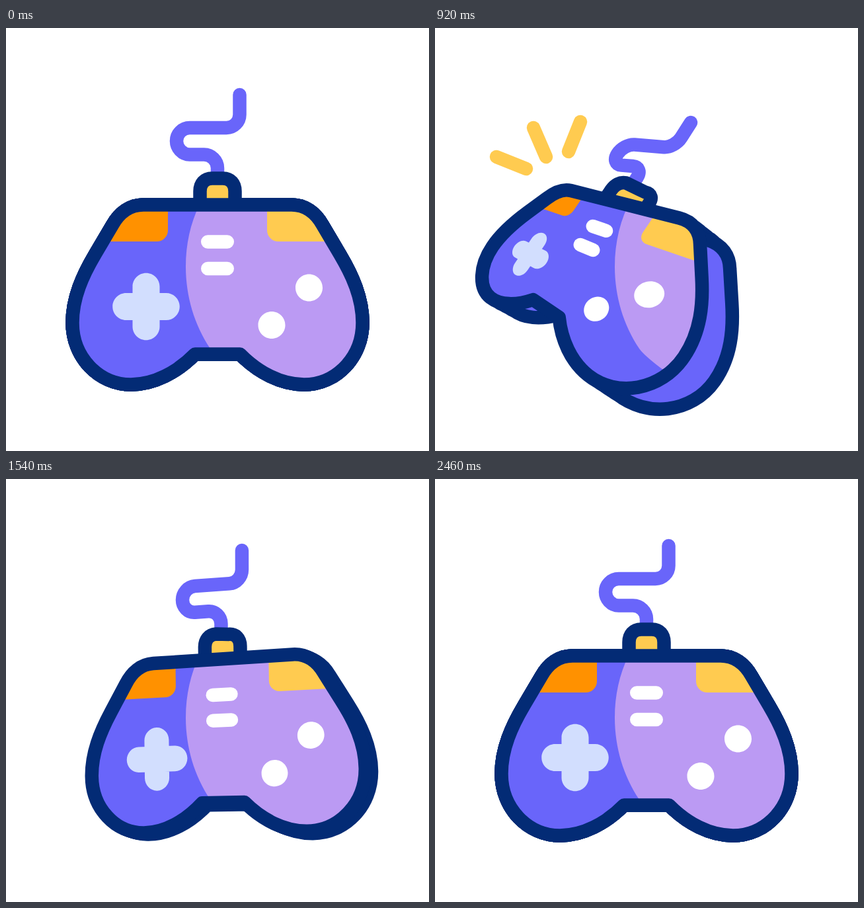
Write an HTML page that moves like this. It is 640 px wide and 640 px high and loops after 2700 ms.

```html
<!DOCTYPE html>
<html lang="en">
<head>
<meta charset="utf-8">
<title>Game controller</title>
<style>
  html, body { margin: 0; width: 100%; height: 100%; overflow: hidden; background: #fff; }
  svg { display: block; width: 100%; height: 100%; }
  .line { stroke-width: 20.5; stroke-linejoin: round; stroke-linecap: round; }
</style>
</head>
<body>
<svg id="stage" viewBox="0 0 640 640">
  <defs><clipPath id="inside"><path id="clip"/></clipPath></defs>
</svg>
<script>
const LOOP = 2700;
const NAVY = '#032b75', BLUE = '#6965fa', LILAC = '#bb9af3', YELLOW = '#ffcb50',
      ORANGE = '#ff9100', PALE = '#d2defe', WHITE = '#fff';

// Rounded bar as a path made of absolute points, so that it can be projected.
function bar(cx, cy, w, h) {
  const r = Math.min(w, h) / 2, k = r * 0.448;
  const l = cx - w / 2, t = cy - h / 2, R = cx + w / 2, b = cy + h / 2;
  return `M${l + r} ${t} L${R - r} ${t} C${R - k} ${t} ${R} ${t + k} ${R} ${t + r} ` +
    `L${R} ${b - r} C${R} ${b - k} ${R - k} ${b} ${R - r} ${b} ` +
    `L${l + r} ${b} C${l + k} ${b} ${l} ${b - k} ${l} ${b - r} ` +
    `L${l} ${t + r} C${l} ${t + k} ${l + k} ${t} ${l + r} ${t} Z`;
}

const shape = {
  body: 'M208 267.5 L432 267.5 C453 267.5 469 280 479 298 L505 342 C524 374 539.5 408 539.5 446 ' +
    'C539.5 498 500 539.5 451 539.5 C416 539.5 381 521 354 493.5 L286 493.5 ' +
    'C259 521 224 539.5 189 539.5 C140 539.5 100.5 498 100.5 446 ' +
    'C100.5 408 116 374 135 342 L161 298 C171 280 187 267.5 208 267.5 Z',
  neck: 'M293.5 267.5 L293.5 247 C293.5 235.5 300 227.5 312 227.5 L328 227.5 ' +
    'C340 227.5 346.5 235.5 346.5 247 L346.5 267.5',
  cable: 'M353.5 101 L353.5 131 C353.5 142 344.5 151 333.5 151 L278 151 C267 151 258 160 258 171 ' +
    'C258 182 267 191.5 278 191.5 L299.5 191.5 C310.5 191.5 320 200.5 320 212 L320 235',
  light: 'M302 250 C282 283 272 321 272 361 C272 406 285 449 309 485 C311 488 314 491 317 494 ' +
    'C333 509 354 525 376 534 L470 575 L640 575 L640 200 L330 200 Z',
  leftKey: 'M140 260 L245 260 L245 306 C245 315.5 237.5 323 228 323 L140 323 Z',
  rightKey: 'M500 260 L395 260 L395 306 C395 315.5 402.5 323 412 323 L500 323 Z',
  cross: bar(212, 421.5, 41, 101.5) + bar(212, 421.5, 101.5, 41),
  slots: 'M305.25 323.5 L334.75 323.5 M305.25 364 L334.75 364',
  dots: bar(458.5, 393, 41, 41) + bar(402, 449.5, 41, 41)
};

// Pose: top left, top right, cross, dot, cable end, cable corner, cable loop, depth.
const rest = [208, 267.5, 432, 267.5, 212, 421.5, 458.5, 393, 353.5, 101, 353.5, 151, 258, 171, 0, 0];
const turnA = [213.4, 267.3, 417.5, 276.1, 196.8, 405.2, 426, 399.5, 364.5, 114, 357.5, 162.5, 266, 183, 15, 8.5];
const turnB = [215.8, 266, 403.2, 281.9, 182.5, 389.5, 394, 404, 374, 126, 361.5, 171.5, 272, 192, 27.5, 16.5];
const turnC = [205.5, 246, 369.5, 287.5, 143, 342, 323.5, 403, 387, 143, 362.5, 181.5, 276, 190.5, 43.5, 33.5];
const swing = [222.9, 279, 433.3, 265.5, 228, 423.7, 461, 387.7, 357, 108, 357, 157, 267, 183, 9, 4];

function tilt(deg) {
  const c = Math.cos(deg * Math.PI / 180), s = Math.sin(deg * Math.PI / 180);
  const out = [];
  for (let i = 0; i < 14; i += 2) {
    const x = rest[i] - 336, y = rest[i + 1] - 137;
    out.push(336 + c * x + s * y, 137 - s * x + c * y);
  }
  return out.concat(0, 0);
}

const keys = [
  { t: 0, p: rest, stop: true },
  { t: 320, p: turnA },
  { t: 490, p: turnB },
  { t: 930, p: turnC, stop: true },
  { t: 1280, p: turnB },
  { t: 1540, p: swing },
  { t: 1715, p: tilt(8), stop: true },
  { t: 1940, p: tilt(5.15) },
  { t: 2260, p: rest, stop: true },
  { t: LOOP, p: rest, stop: true }
];

function slope(i, n) {
  const k = keys[i];
  if (k.stop) return 0;
  const a = keys[i - 1], b = keys[i + 1], h0 = k.t - a.t, h1 = b.t - k.t;
  return ((k.p[n] - a.p[n]) / h0 * h1 + (b.p[n] - k.p[n]) / h1 * h0) / (h0 + h1);
}

function poseAt(t) {
  let i = 0;
  while (i < keys.length - 2 && t >= keys[i + 1].t) i++;
  const a = keys[i], b = keys[i + 1], h = b.t - a.t, s = (t - a.t) / h;
  const s2 = s * s, s3 = s2 * s, e = 3 * s2 - 2 * s3;
  return a.p.map((v, n) => v + (b.p[n] - v) * e +
    h * ((s3 - 2 * s2 + s) * slope(i, n) + (s3 - s2) * slope(i + 1, n)));
}

// Barycentric coordinates of (x, y) in the triangle a, b, c.
function bary(x, y, [a, b, c]) {
  const ux = a[0] - c[0], uy = a[1] - c[1], vx = b[0] - c[0], vy = b[1] - c[1];
  const px = x - c[0], py = y - c[1], det = ux * vy - uy * vx;
  const m = (px * vy - py * vx) / det, n = (ux * py - uy * px) / det;
  return [m, n, 1 - m - n];
}

const at = (p, i) => [p[2 * i], p[2 * i + 1]];
const plate = p => [at(p, 2), at(p, 3), at(p, 0)];
const wire = p => [at(p, 4), at(p, 5), at(p, 6)];

function mapper(from, to, w) {
  return (x, y) => {
    const k = bary(x, y, from).map((v, i) => v * w[i]);
    const sum = k[0] + k[1] + k[2];
    return [0, 1].map(j => (k[0] * to[0][j] + k[1] * to[1][j] + k[2] * to[2][j]) / sum);
  };
}

// Perspective of the plate, moved back by a share of its depth.
function project(p, depth) {
  const q = p.slice(), dx = p[14] * depth, dy = p[15] * depth;
  for (const i of [0, 1, 2, 3]) {
    const right = i % 2;
    q[2 * i] += dx * (right ? 1 : 0.8);
    q[2 * i + 1] += dy * (right ? 1 : 0.62);
  }
  const from = plate(rest), to = plate(q);
  const a = bary(...at(rest, 1), from), b = bary(...at(q, 1), to);
  return mapper(from, to, a.map((v, i) => b[i] / v));
}

const warp = (d, map) => d.replace(/(-?[\d.]+) (-?[\d.]+)/g,
  (m, x, y) => map(+x, +y).map(v => v.toFixed(2)).join(' '));

const stage = document.getElementById('stage');
const clip = document.getElementById('clip');

function add(tag, attrs, parent = stage) {
  const el = document.createElementNS('http://www.w3.org/2000/svg', tag);
  for (const k in attrs) el.setAttribute(k, attrs[k]);
  return parent.appendChild(el);
}
const outlined = (fill, stroke) => add('path', { class: 'line', fill, stroke });

const sides = [0.25, 0.5, 0.75].map(depth => ({ depth, el: outlined(NAVY, NAVY) }));
const back = outlined(BLUE, NAVY);
const cable = outlined('none', BLUE);
const neck = outlined(YELLOW, NAVY);
const face = add('g', { 'clip-path': 'url(#inside)' });
const base = add('path', { fill: BLUE }, face);
add('path', { fill: LILAC, d: shape.light }, face);
const parts = [['leftKey', ORANGE], ['rightKey', YELLOW], ['cross', PALE], ['dots', WHITE]]
  .map(([name, fill]) => ({ name, el: add('path', { fill }, face) }));
parts.push({ name: 'slots', el: outlined('none', WHITE) });
const rim = outlined('none', NAVY);
const sparks = [[138, 213, 93, 195], [168, 195, 149, 151], [202, 187, 220, 142]]
  .map(ends => ({ ends, el: outlined('none', YELLOW) }));

function ease(t, from, to) {
  const s = Math.min(1, Math.max(0, (t - from) / (to - from)));
  return s * s * (3 - 2 * s);
}

function draw(t) {
  const pose = poseAt(t), front = project(pose, 0), middle = project(pose, 0.45);
  const set = (el, d) => el.setAttribute('d', d);
  const outline = warp(shape.body, front);

  for (const s of sides) set(s.el, warp(shape.body, project(pose, s.depth)));
  set(back, warp(shape.body, project(pose, 1)));
  set(cable, warp(shape.cable, mapper(wire(rest), wire(pose), [1, 1, 1])));
  // The right half of the neck reaches back, which shows its thickness.
  set(neck, warp(shape.neck, (x, y) => (x > 320 ? middle : front)(x, y)));
  for (const el of [clip, base, rim]) set(el, outline);
  for (const p of parts) set(p.el, warp(shape[p.name], front));

  const tail = ease(t, 1000, 1180), head = ease(t, 660, 840);
  for (const { ends: [x, y, X, Y], el } of sparks) {
    const point = k => `${x + (X - x) * k} ${y + (Y - y) * k}`;
    set(el, head > tail ? `M${point(tail)} L${point(head)}` : '');
  }
}

const start = performance.now();
function tick() {
  draw((performance.now() - start) % LOOP);
  requestAnimationFrame(tick);
}
tick();
</script>
</body>
</html>
```
